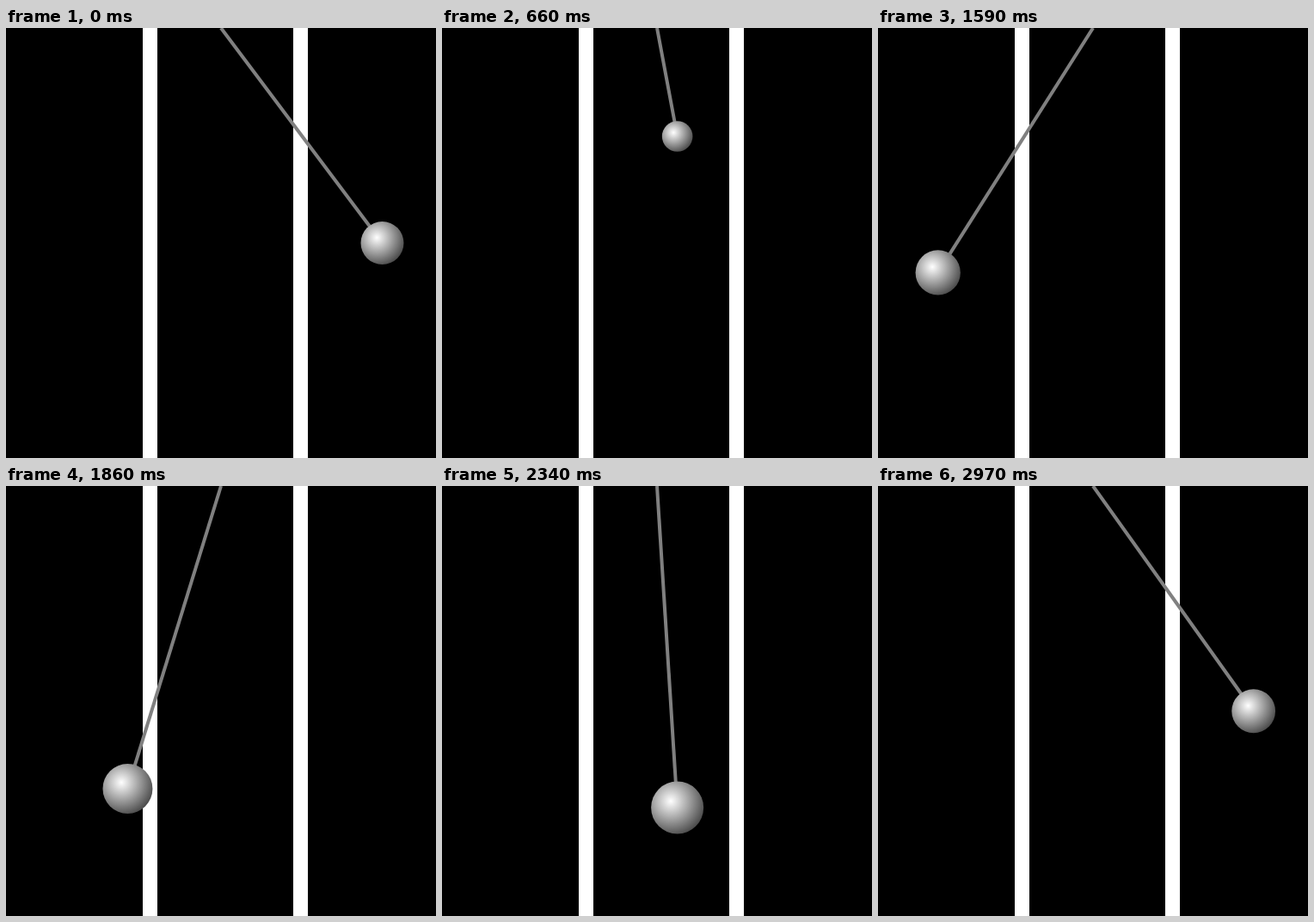
An HTML page with a canvas that plays this animation: 500 by 500 pixels, repeating every 3000 ms.

```html
<!DOCTYPE html>
<html lang="en">
<head>
<meta charset="utf-8">
<title>Orbiting pendulum</title>
<style>
html, body { margin: 0; width: 100%; height: 100%; overflow: hidden; background: #000; }
canvas { display: block; }
</style>
</head>
<body>
<canvas id="stage" width="500" height="500"></canvas>
<script>
const ctx = document.getElementById('stage').getContext('2d');
const STEPS = 100, STEP_MS = 30;
const A = 187.5, B = 125; // half axes of the orbit

function drawBars() {
  ctx.fillStyle = '#fff';
  for (const x of [159, 334]) ctx.fillRect(x, 0, 17, 500);
}

function drawPendulum(angle) {
  const c = Math.cos(angle), s = Math.sin(angle);
  // Polar form of the ellipse: the direction turns evenly
  const rho = A * B / Math.hypot(B * c, A * s);
  const x = 250 + rho * c, y = 250 - rho * s;
  const r = 25 * Math.sqrt(1 - s / 2);

  ctx.strokeStyle = '#808080';
  ctx.lineWidth = 4;
  ctx.beginPath();
  ctx.moveTo(250, 0);
  ctx.lineTo(x, y);
  ctx.stroke();

  const lx = x - r / 4, ly = y - r / 4;
  const shade = ctx.createRadialGradient(lx, ly, 0, lx, ly, 1.9 * r);
  shade.addColorStop(0, '#fff');
  shade.addColorStop(1, '#000');
  ctx.fillStyle = shade;
  ctx.beginPath();
  ctx.arc(x, y, r, 0, 2 * Math.PI);
  ctx.fill();
}

function draw(ms) {
  const step = Math.floor(ms / STEP_MS + 1e-6) % STEPS;
  const behind = step > 0 && step < STEPS / 2;
  const layers = [drawBars, () => drawPendulum(2 * Math.PI * step / STEPS)];
  if (behind) layers.reverse();
  ctx.fillStyle = '#000';
  ctx.fillRect(0, 0, 500, 500);
  layers.forEach(layer => layer());
}

const start = performance.now();
function tick() {
  draw(performance.now() - start);
  requestAnimationFrame(tick);
}
tick();
</script>
</body>
</html>
```
